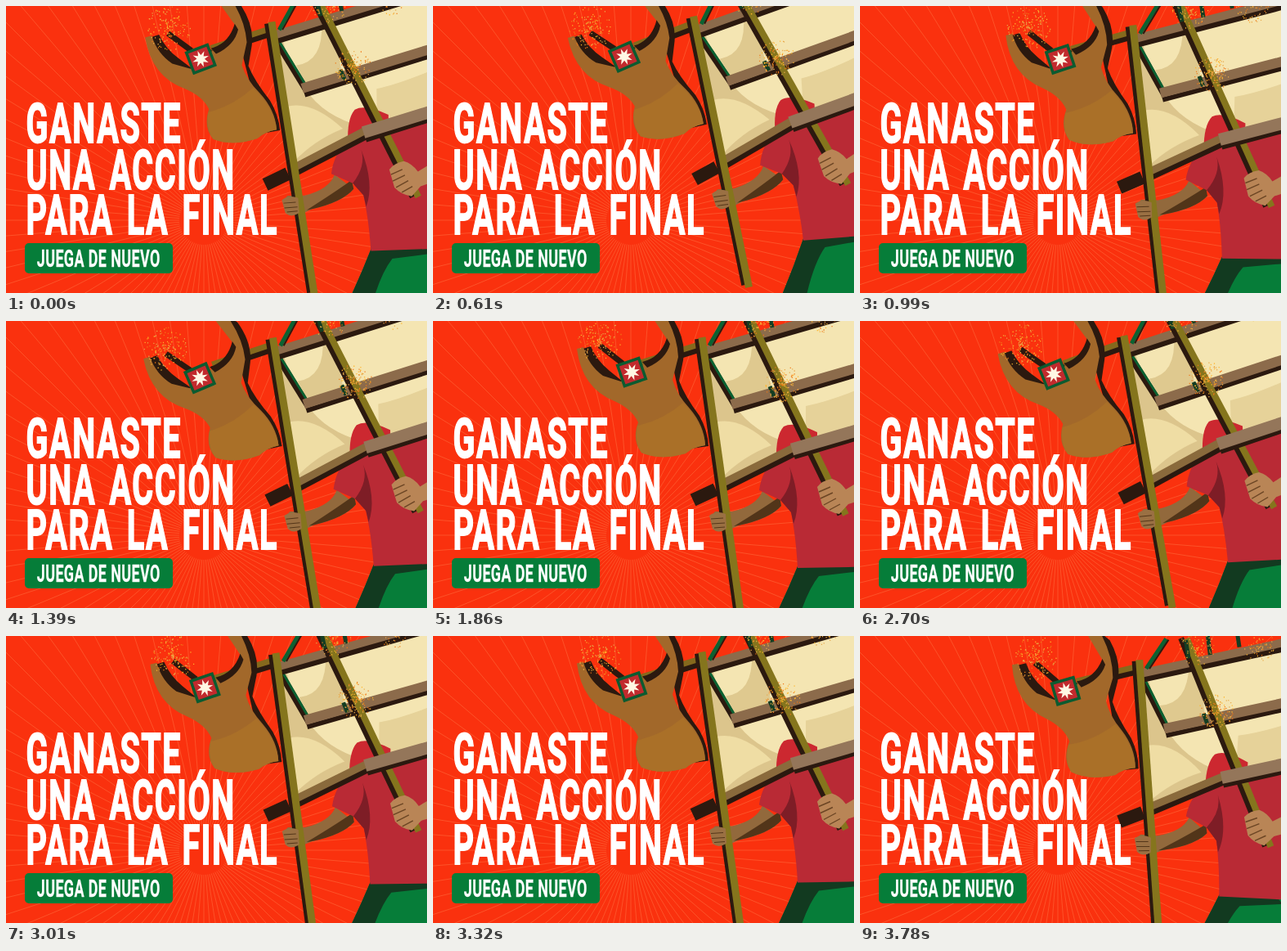
Write an HTML page that moves like this. It is 515 by 351 pixels and loops after 3850 ms.

```html
<!DOCTYPE html>
<html lang="es">
<head>
<meta charset="utf-8">
<title>Ganaste una acción para la final</title>
<style>
html, body { margin: 0; width: 100%; height: 100%; overflow: hidden; background: #fa310e; }
svg { display: block; width: 515px; height: 351px; }
.type { font-family: Roboto, "Liberation Sans", sans-serif; font-weight: 700; fill: #fff; stroke: #fff; transform: scaleX(.6); }
.title { font-size: 66px; letter-spacing: 2.6px; word-spacing: 8px; stroke-width: 1.8; }
.button { font-size: 30px; letter-spacing: .6px; stroke-width: .3; }
.sparks path { fill: none; stroke-width: 1.3; }
</style>
</head>
<body>
<svg viewBox="0 0 515 351">
  <rect width="515" height="351" fill="#fa310e"/>
  <path id="rays" fill="none" stroke="#ff8450" stroke-opacity=".4"/>

  <g id="rig">
    <!-- cloth -->
    <path fill="#f4e5b2" d="M328 38L600-40V112L438 164L356 206Z"/>
    <path fill="#dcc58c" d="M329 40L342 42Q352 82 370 104Q390 136 438 150V164L356 206Z"/>
    <path fill="#efdda4" d="M345 124Q376 116 414 152Q378 166 353 192Z"/>
    <path fill="#dfc98f" d="M390 22Q410 44 414 88L372 100L358 74Q392 70 390 22Z"/>
    <path fill="#e6d299" d="M456 104Q498 96 580 58V116L456 150Z"/>

    <!-- bearer -->
    <path fill="#067d39" d="M446 300L560 290V390H404Q428 344 446 300Z"/>
    <path fill="#123a20" d="M446 300L515 296L524 306L472 312Q454 334 440 390H404Q428 344 446 300Z"/>
    <path fill="#92693c" d="M403 208Q396 226 366 233L345 233Q338 240 342 250L357 258L374 250Q412 242 426 226Z"/>
    <path fill="#523519" d="M368 251Q404 229 424 215L426 226Q412 242 374 250Z"/>
    <path fill="#cc2830" d="M420 170Q419 140 429 129Q442 122 470 136V170Z"/>
    <path fill="#b92a35" d="M420 166L560 112V300L446 302Q444 264 438 234L425 219L399 207Q402 183 420 166Z"/>
    <path fill="#7e1d26" d="M425 219Q442 198 436 178Q452 220 441 248L438 234Z"/>

    <!-- frame -->
    <g fill="none">
      <path stroke="#2b190f" stroke-width="16" d="M318 219L346 206"/>
      <path stroke="#8a6a3c" stroke-width="10" d="M356 198L442 155"/>
      <path stroke="#2b190f" stroke-width="6" d="M356 206L442 163"/>
      <path stroke="#2b190f" stroke-width="8" d="M331 38L370 104"/>
      <path stroke="#0b6232" stroke-width="3" d="M332 34L370 99"/>
      <path stroke="#2b190f" stroke-width="8" d="M254 57L328 34"/>
      <path stroke="#85691d" stroke-width="7" d="M254 51L328 28"/>
      <path stroke="#2b190f" stroke-width="7" d="M330 45L600-33"/>
      <path stroke="#8c6b4b" stroke-width="10" d="M330 37L600-41"/>
      <path stroke="#2b190f" stroke-width="6" d="M368 110L600 42"/>
      <path stroke="#8c6b4b" stroke-width="12" d="M365 102L600 34"/>
      <path stroke="#2b190f" stroke-width="7" d="M378-10L498 237"/>
      <path stroke="#85751d" stroke-width="8" d="M385-10L505 237"/>
      <path stroke="#2b190f" stroke-width="6" d="M442 166L580 125"/>
      <path stroke="#94765a" stroke-width="15" d="M439 157L580 116"/>
      <path stroke="#2b190f" stroke-width="6" d="M323 22L370 352"/>
      <path stroke="#85751d" stroke-width="9" d="M329 20L376 355"/>
      <path stroke="#0b6232" stroke-width="5" d="M338 30L360-8"/>
      <path stroke="#2b190f" stroke-width="2" d="M342 30L363-7"/>
      <path stroke="#143d22" stroke-width="5" d="M384-8L389 14M410-18L415 8M446-22L450-4M412 80L417 92"/>
    </g>

    <!-- hands -->
    <path fill="#9a7043" d="M338 238Q347 231 358 236L359 254Q349 261 342 254Z"/>
    <path fill="none" stroke="#543619" d="M340 242L355 241M341 248L357 247M344 253L357 252"/>
    <path fill="#b98556" d="M470 203Q476 195 488 193Q498 196 505 206L545 182V212L508 224L497 236Q484 234 476 225Z"/>
    <path fill="none" stroke="#6b4524" stroke-width="1.4" d="M472 209L486 203M474 217L489 210M478 225L493 217M485 231L498 224"/>

    <!-- bull -->
    <g id="head">
      <path fill="#2b190f" d="M278-14L294-2Q310 24 306 48L301 73Q308 92 326 116Q336 134 337 153L316 156Z"/>
      <path fill="#2b190f" d="M183 34L193 31Q200 48 216 61L232 74L222 82Q196 68 183 34Z"/>
      <path fill="#a2682a" d="M176 34L184 32Q190 54 208 67L230 74L260 51Q279 47 286 22L262-14H280Q299 16 300 44L293 72Q298 90 314 107Q332 128 333 152Q318 154 309 162Q278 171 255 161Q243 146 251 124Q244 108 222 98Q182 82 176 34Z"/>
      <path fill="#aa7028" d="M250 128Q280 122 306 100Q331 126 333 152Q318 154 309 162Q278 171 255 161Q246 148 250 128Z"/>
      <path fill="#2b190f" d="M256 50Q278 45 286 21L290 28Q285 47 262 57Z"/>
      <path fill="none" stroke="#2b190f" stroke-width="7" d="M204 30L232 52"/>
      <g transform="translate(243 62.5) rotate(-19)">
        <rect x="-15.5" y="-15" width="31" height="30" fill="#0b5b30"/>
        <rect x="-12" y="-11.5" width="24" height="23" fill="#c12a2d"/>
        <path id="star" fill="#fff8e4"/>
      </g>
      <g class="sparks" data-x="204" data-y="24" data-r="27" data-n="150"></g>
    </g>
    <g class="sparks" data-x="427" data-y="77" data-r="22" data-n="135"></g>
    <g class="sparks" data-x="398" data-y="1" data-r="22" data-n="90"></g>
    <g class="sparks" data-x="474" data-y="-6" data-r="20" data-n="60"></g>
  </g>

  <g class="type title">
    <text x="41" y="167">GANASTE</text>
    <text x="41" y="224">UNA ACCIÓN</text>
    <text x="41" y="279">PARA LA FINAL</text>
  </g>
  <rect x="23" y="290" width="181" height="37" rx="5" fill="#067d39"/>
  <text class="type button" x="63" y="319">JUEGA DE NUEVO</text>
</svg>
<script>
const LOOP = 3850, STEP = 77, LAST = 49;
const rig = document.getElementById('rig');
const head = document.getElementById('head');

// step, lean, shift x, shift y, head tilt
const poses = [
  [0, .9, -.5, -1, 1], [3, -1.1, -1.5, 3, 1], [8, 3.6, 3.5, -9, 1],
  [13, -1.6, -1.5, 4, 1], [18, 1.3, 2.5, 0, 3], [21, 3.4, 3.5, -7, 1],
  [24, 0, 0, 0, 0], [28, -1.6, -1.5, 4, 0], [32, 3.4, 3.5, -8, 1],
  [35, 2.1, 2, -3, 1], [37, 3.5, 3.5, -8, 1], [40, -1.6, -1.5, 4, 0],
  [43, 0, 0, -.5, 0], [46, 3.6, 3.5, -8, 1], [49, -3.9, -2.5, 10, 1]
];

function poseAt(step) {
  const i = Math.max(1, poses.findIndex(p => p[0] >= step));
  const a = poses[i - 1], b = poses[i];
  const k = (1 - Math.cos(Math.PI * (step - a[0]) / (b[0] - a[0]))) / 2;
  return a.map((v, j) => v + (b[j] - v) * k);
}

function random(seed) {
  let s = seed * 7919 + 17;
  return () => (s = (s * 16807) % 2147483647) / 2147483647;
}

const polar = (x, y, r, a) =>
  `${(x + r * Math.cos(a)).toFixed(1)} ${(y + r * Math.sin(a)).toFixed(1)}`;

let d = '';
for (let i = 0; i < 80; i++) {
  const a = i * Math.PI / 40;
  d += `M${polar(242, 262, 30, a)}L${polar(242, 262, 420, a)}`;
}
document.getElementById('rays').setAttribute('d', d);

const points = Array.from({ length: 16 }, (_, i) =>
  polar(0, 0, i % 2 ? 4.8 : 10.5, i * Math.PI / 8));
document.getElementById('star').setAttribute('d', `M${points.join('L')}Z`);

const tints = ['#ffb52b', '#f07818', '#e8a94a'];
const bursts = [...document.querySelectorAll('.sparks')].map(g => {
  const paths = tints.map(tint => {
    const p = document.createElementNS(g.namespaceURI, 'path');
    p.setAttribute('stroke', tint);
    return g.appendChild(p);
  });
  const [x, y, r, n] = ['x', 'y', 'r', 'n'].map(k => +g.dataset[k]);
  return { paths, x, y, r, n };
});

function drawSparks(step) {
  bursts.forEach(({ paths, x, y, r, n }, b) => {
    const rnd = random(step * 5 + b + 1);
    paths.forEach(p => {
      let dots = '';
      for (let i = 0; i < n / 3; i++) {
        dots += `M${polar(x, y, r * Math.pow(rnd(), .8), rnd() * 2 * Math.PI)}h1.2`;
      }
      p.setAttribute('d', dots);
    });
  });
}

let shown = -1;
const start = performance.now();
function draw() {
  const t = (performance.now() - start) % LOOP;
  const step = Math.min(LAST, Math.floor((t + 20) / STEP));
  if (step !== shown) {
    shown = step;
    const [, lean, x, y, tilt] = poseAt(step);
    rig.setAttribute('transform', `translate(${x} ${y}) rotate(${-lean} 348 243)`);
    head.setAttribute('transform', `rotate(${-tilt} 330 150)`);
    drawSparks(step);
  }
  requestAnimationFrame(draw);
}
draw();
</script>
</body>
</html>
```
